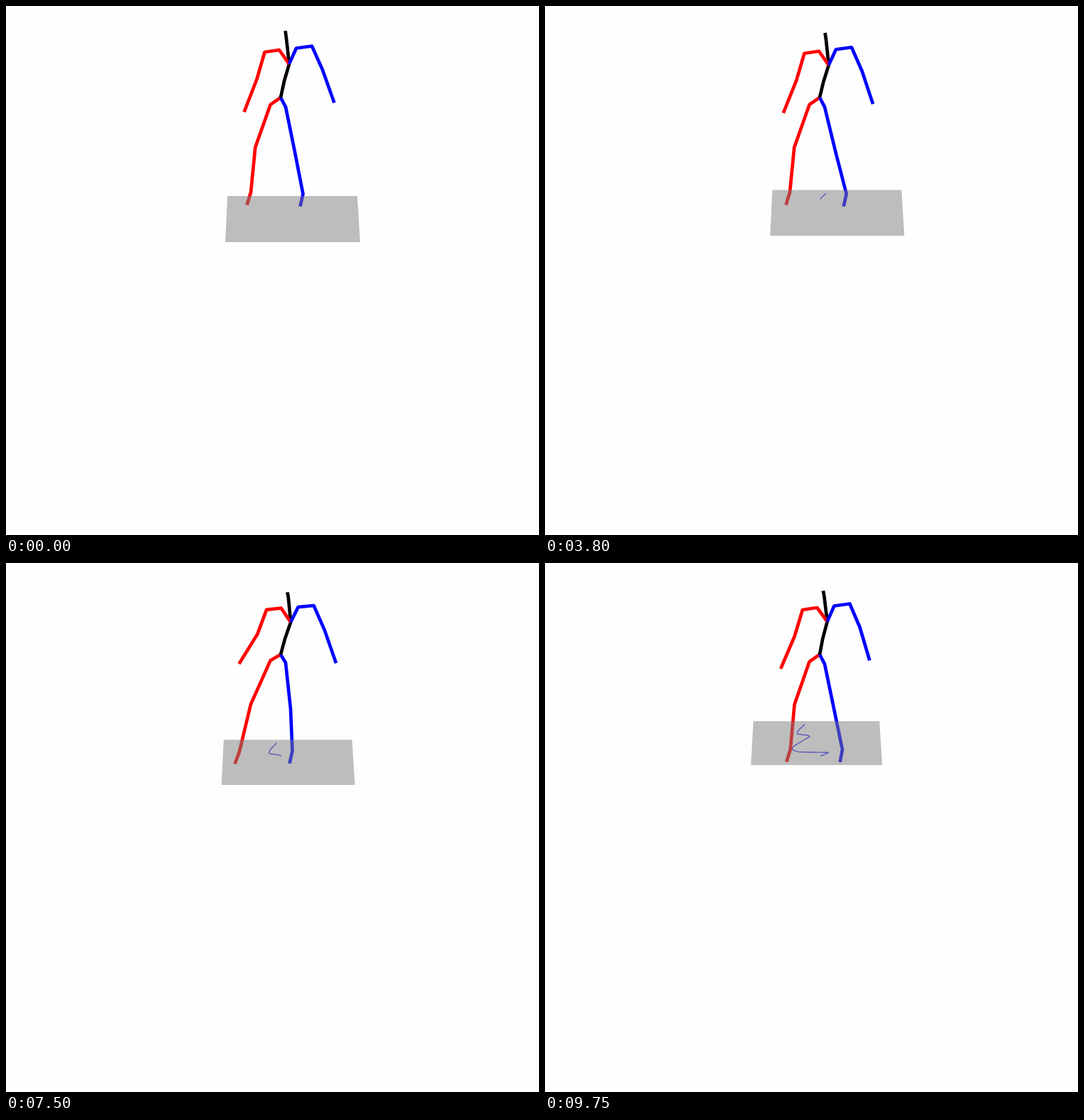
Animation of 751x746 px, one loop 9800 ms. Source, as an HTML page with a canvas:

```html
<!DOCTYPE html>
<html lang="en">
<head>
<meta charset="utf-8">
<title>Walking skeleton</title>
<style>
  html, body { margin: 0; width: 100%; height: 100%; overflow: hidden; background: #fefefe; }
  canvas { display: block; }
</style>
</head>
<body>
<canvas id="stage" width="751" height="746"></canvas>
<script>
const LOOP = 9800, STEP = 50;
const HIP = [387, 129], ROOT = [388, 272.3];
const RED = '#f00', BLUE = '#00f', BLACK = '#000';
const ctx = document.getElementById('stage').getContext('2d');

// Rest pose; every limb starts at the hip or the neck.
const chest = [392, 106], neck = [399, 81.8], chin = [395, 45.5], head = [393.6, 35];
const redArm = [[385, 62], [364.5, 65], [353.5, 103], [335.5, 149.5]];
const blueArm = [[409, 59.5], [431, 56.5], [446, 90], [462.5, 136.5]];
const redLeg = [[372.5, 139.2], [351.2, 199.5], [345, 262.5], [339.5, 280.5]];
const blueLeg = [[394, 142.3], [407, 206], [418.5, 265], [414.5, 282.7]];

// time, sway, drop, roll, nod, red hand, blue hand, red foot, blue foot, blue lift
const motion = [
  [0, 0, 0, 0, 0, 0, 0, 0, 0, 0],
  [5000, 1, 2.2, 0, 1, 0.5, -1.7, 0, 7.8, 0],
  [6300, 1, 2.5, 0, 1, 0, -2, 0, 9, 0],
  [7500, 2.5, 2, -1.6, 4, 7, 0, -16, -15, 0],
  [8550, -6.7, 2.7, 1.7, 4, 2, 2, 0.5, 18, 13],
  [9050, 1, 2, -0.5, 3, 3, -1, -23, -9, 0],
  [9750, -1.5, 1, 0, 3, 1.3, -3.5, 0.8, 0.5, 2]
];
// time, sideways and forward distance walked
const route = [
  [0, 0, 0], [5950, -10.5, 13.8], [6400, -10.7, 15.2], [7550, 6.8, 19.5],
  [8230, -18, 38], [8550, -5.8, 42.7], [9100, 33.5, 43.5], [9750, 22, 48.5]
];

// Monotone cubic interpolation of every column of a key table.
function sample(keys, time) {
  const last = keys.length - 2;
  let i = 0;
  while (i < last && keys[i + 1][0] <= time) i++;
  const [a, b] = [keys[i], keys[i + 1]];
  const span = b[0] - a[0], u = (time - a[0]) / span, v = 1 - u;
  const slope = (k, c) => (keys[k + 1][c] - keys[k][c]) / (keys[k + 1][0] - keys[k][0]);
  const tangent = (k, c) => {
    if (k === 0 || k > last) return slope(Math.min(k, last), c);
    const p = slope(k - 1, c), q = slope(k, c);
    return p * q > 0 ? 2 * p * q / (p + q) : 0;
  };
  return a.slice(1).map((from, n) => {
    const c = n + 1;
    return from * v * v * (1 + 2 * u) + b[c] * u * u * (3 - 2 * u)
      + span * u * v * (v * tangent(i, c) - u * tangent(i + 1, c));
  });
}

// Screen height of a point on the ground that lies this far behind the hips.
const groundY = distance => ROOT[1] - distance + 0.0015 * distance ** 2;

function trace(points) {
  ctx.beginPath();
  for (const [x, y] of points) ctx.lineTo(x, y);
}

function line(points, color, width = 4.7) {
  trace(points);
  ctx.strokeStyle = color;
  ctx.lineWidth = width;
  ctx.stroke();
}

function drawTrail(time, side, forward) {
  const points = [];
  for (let s = 0; s <= time; s += STEP) {
    const [x, y] = sample(route, s);
    points.push([ROOT[0] + x - side, groundY(forward - y)]);
  }
  line(points, BLUE, 1.1);
}

function drawBody(time) {
  const [sway, drop, roll, nod, redHand, blueHand, redFoot, blueFoot, lift] = sample(motion, time);

  const spineJoint = ([x, y], dy = 0) => {
    const height = Math.min(1.1, (HIP[1] - y) / 55);
    return [x + sway * height, y + drop * height + dy];
  };
  const armJoint = ([x, y], dx = 0, dy = 0) =>
    [x + 1.05 * sway + dx, y + drop + roll * (394 - x) / 40 + dy];
  const arm = ([collar, shoulder, elbow, hand], dx, dy) => [
    spineJoint(neck), armJoint(collar), armJoint(shoulder),
    armJoint(elbow, 0.2 * dx, 0.4 * dy), armJoint(hand, dx, dy)
  ];
  const leg = ([thigh, knee, ankle, toe], dx, up) => [
    HIP, [thigh[0], thigh[1] + roll], [knee[0] + 0.4 * dx, knee[1]],
    [ankle[0] + dx, ankle[1] - up], [toe[0] + dx + 0.35 * up, toe[1] - 0.9 * up]
  ];

  line(leg(redLeg, redFoot, -0.12 * redFoot * Math.min(0, roll)), RED);
  line(leg(blueLeg, blueFoot, lift), BLUE);
  line([spineJoint(head, nod), spineJoint(chin), spineJoint(neck), spineJoint(chest), HIP], BLACK);
  line(arm(redArm, -1.4 * redHand, -redHand), RED);
  line(arm(blueArm, blueHand, 0), BLUE);
}

function drawGround(x, y) {
  const far = ROOT[1] - y;
  const top = y - 4.4, bottom = y + 60.7 - 0.07 * far;
  trace([
    [x - 76 + 0.08 * far, top], [x + 107 - 0.04 * far, top],
    [x + 111 - 0.04 * far, bottom], [x - 79 + 0.07 * far, bottom]
  ]);
  ctx.fillStyle = 'rgba(127, 127, 127, 0.5)';
  ctx.fill();
}

function draw(time) {
  ctx.fillStyle = '#fefefe';
  ctx.fillRect(0, 0, 751, 746);
  ctx.lineJoin = 'round';
  const [side, forward] = sample(route, time);
  drawTrail(time, side, forward);
  drawBody(time);
  drawGround(ROOT[0] - side, groundY(forward));
}

function tick() {
  draw(Math.floor(performance.now() % LOOP / STEP) * STEP);
  requestAnimationFrame(tick);
}
tick();
</script>
</body>
</html>
```
